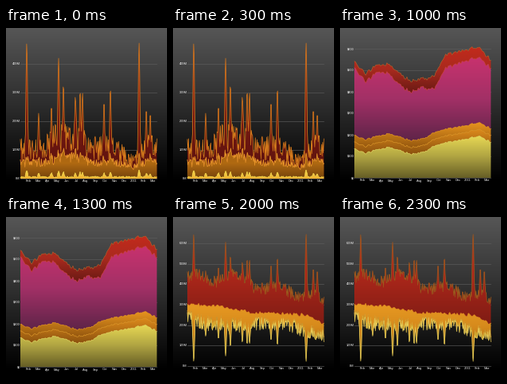
Recreate the animation shown at these times as a matplotlib script. Size 202 by 202 pixels, loop 2.5 s.

```python
import numpy as np
import matplotlib.pyplot as plt
from matplotlib.animation import FuncAnimation
from matplotlib.colors import to_rgb
from matplotlib.patches import Polygon

SIZE, DPI = 202, 100
LEFT, RIGHT = 18, 189.3
PX = 72 / DPI  # points per pixel
X = np.linspace(LEFT, RIGHT, 240)
MONTHS = "Feb Mar Apr May Jun Jul Aug Sep Oct Nov Dec 2011 Feb Mar".split()
WEEKS = ["Aug 15", "Aug 22", "Aug 29", "Sep 5", "Sep 12", "Sep 19", "Sep"]

RED, RED_DARK = "#c42a1c", "#6a1a14"
AMBER, AMBER_DARK = "#e8951f", "#96580f"
GOLD = "#f6dc50"

# Busy days as (x, height), shared by both daily charts
PEAKS = [(26, 169), (41, 82), (57, 88), (66, 151), (72, 115), (87, 102), (93, 107),
         (96, 107), (123, 93), (131, 110), (167, 170), (176, 84), (181, 79)]

fig = plt.figure(figsize=(SIZE / DPI, SIZE / DPI), dpi=DPI, facecolor="black")
ax = fig.add_axes([0, 0, 1, 1])


def curve(*values):
    """Line through evenly spaced key values."""
    return np.interp(X, np.linspace(LEFT, RIGHT, len(values)), values)


def scatter(seed, low, high):
    return np.random.default_rng(seed).uniform(low, high, X.size)


def wave(seed, amp, knots=110):
    return curve(*np.random.default_rng(seed).normal(0, amp, knots))


def tent(x, height, width):
    return height * np.clip(1 - abs(X - x) / width, 0, 1)


def spikes(peaks):
    return np.max([h * np.clip(1.25 - abs(X - x) / 1.7, 0, 1) for x, h in peaks], axis=0)


def ramp(colors, extent, **kw):
    stops = np.array([to_rgb(c) for c in colors])
    t = np.linspace(0, len(stops) - 1, 256)
    rows = np.stack([np.interp(t, range(len(stops)), ch) for ch in stops.T], axis=1)
    return ax.imshow(rows[:, None, :], extent=extent, aspect="auto",
                     interpolation="bilinear", **kw)


def area(top, bottom, colors, edge, width=0.7):
    bottom = np.broadcast_to(bottom, X.shape)
    outline = np.r_[np.c_[X, top], np.c_[X, bottom][::-1]]
    shape = ax.add_patch(Polygon(outline, fc="none", ec="none"))
    ramp(colors, (LEFT, RIGHT, bottom.max(), top.min()), zorder=2).set_clip_path(shape)
    ax.plot(X, top, color=edge, lw=width * PX, zorder=3)


def backdrop(top, bottom, steps, form, base, names=MONTHS, first=28, gap=12):
    ramp(["#565656", "#2d2d2d", "#000000"], (0, SIZE, 192, 0), zorder=0)
    for k in range(steps + 1):
        y = bottom + (top - bottom) * k / steps
        ax.plot([LEFT, RIGHT], [y, y], color="#5e5e5e", lw=0.6 * PX, zorder=1)
        ax.text(LEFT, y, form.format(100 * k), ha="right", va="center")
    for i, name in enumerate(names):
        ax.text(first + gap * i, base, name, ha="center", va="center")


def burst():
    backdrop(45, 189, 4, "{}M", 192)
    level = curve(34, 33, 34, 46, 56, 54, 36, 36, 38, 28, 20, 38, 37)
    tall = spikes(PEAKS)
    total = np.maximum(level * scatter(4, 0.58, 1.5), tall)
    mid = (7 + 0.36 * level) * scatter(9, 0.75, 1.3) + 0.06 * tall
    mid = np.minimum(mid, total - 1)
    low = 1.2 + scatter(2, 0, 2) + 0.05 * tall
    area(189 - total, 189, ["#b32a1c", "#7c1a12", "#57120e"], "#d87c1c", 0.75)
    area(189 - mid, 189, ["#a4600f", "#b06a12", "#74420c"], "#e8942a", 0.8)
    area(189 - low, 189, [GOLD, "#f0b030"], GOLD, 0.6)


def days():
    backdrop(24, 189, 6, "{}M", 191.5, WEEKS, 23, 27.6)
    bumps = sum(tent(*b) for b in [
        (31, 9, 4), (39, 6, 4), (59, 18, 5), (71, 14, 10), (91, 27, 4), (99, 15, 9),
        (119, 17, 5), (140, 14, 10), (156, 14, 8), (175, 33, 4.5), (183, 7, 7)])
    total = curve(150, 150, 146, 144, 149, 147, 149, 142, 137, 124, 133) - bumps
    hump = tent(140, 13, 13)
    upper = 174.5 - 0.25 * bumps - hump - tent(175, 26, 4) - tent(155, 4, 5)
    lower = 177 - 0.28 * bumps - hump - tent(155, 3, 5)
    base = 187.8 + 0.35 * np.sin(X / 3.7)
    area(total, upper, [RED, "#8a1e16", "#5a1410"], "#b06a20")
    area(upper, lower, [AMBER, "#b06c14"], "#f0a028", 0.8)
    area(lower, base, ["#c98a1a", "#a0700f", "#6e4c08"], "#f0b030", 0.8)
    area(base, 189, [GOLD, GOLD], GOLD, 0.6)


def layers(red, pink, amber, ochre, gold, floor):
    area(red, pink, [RED, "#a82a1e", RED_DARK], "#b8622a", 0.6)
    area(pink, amber, ["#c8326e", "#a23066", "#5e2448"], "#d8403c", 0.6)
    area(amber, ochre, [AMBER, AMBER_DARK], "#f09a28", 0.6)
    area(ochre, gold, ["#dc8a1c", "#8a500e"], "#f0a42c", 0.6)
    area(gold, floor, ["#eadb55", "#b0a442", "#665e26"], "#f4e468", 0.6)


def growth():
    backdrop(26, 188, 6, "${}", 191.5)
    ripple = wave(5, 1.5)
    red = curve(43, 57, 47, 46, 58, 68, 63, 60, 34, 31, 27, 25, 40) + ripple
    pink = red + curve(8, 10, 9, 14, 14, 11, 17, 16, 14, 13, 10)
    gold = curve(152, 157, 153, 150, 154, 159, 156, 148, 144, 142, 139, 136, 143)
    gold = gold + 0.5 * ripple
    layers(red, pink, gold - 17, gold - 8.5, gold, 188.5)


def stream():
    backdrop(26, 188, 6, "${}", 191.5)
    ripple = wave(8, 1.1)
    red = curve(28, 37, 33, 33, 40, 45, 41, 38, 26, 27, 24, 22, 24) + ripple
    pink = red + curve(8, 9, 9, 8, 9, 8, 10, 12, 13, 13)
    amber = 119.5 - 4.5 * np.exp(-((X - 92) / 22) ** 2) + 0.3 * ripple
    floor = curve(176, 166, 169, 170, 166, 158, 166, 170, 180, 182, 184, 184, 180)
    floor = np.minimum(floor + 1.4 * ripple, 188)
    area(floor, 188.5, ["#0c0c0a", "#060606"], "#1c1a0a", 0.5)
    layers(red, pink, amber, amber + 7.5, amber + 14.5, floor)


def mirror():
    backdrop(33, 187, 6, "{}M", 190)
    tall = spikes(PEAKS)
    red = curve(76, 72, 82, 80, 68, 76, 90, 90, 86, 94, 102, 96, 106)
    red = np.minimum(red - scatter(4, -8, 8), 110 - 0.52 * tall)
    amber = curve(109, 111, 113, 117, 121, 120, 122, 123, 135) + wave(11, 1.3)
    low = curve(124, 136, 135, 138, 135, 136, 136, 145, 150)
    low = np.maximum(low + scatter(12, -9, 8), 120 + 0.36 * tall)
    gold = amber + 0.75 * (low - amber)
    area(red, amber, [RED, "#a8261a", "#7e1c14"], "#a05a1c", 0.7)
    area(amber, gold, ["#e89a22", "#d68a1c", "#a8640f"], "#e88a20", 0.7)
    area(gold, low, ["#e0b030", "#c09a28"], "#e0a030", 0.6)
    ax.plot(X, low, color="#ecd05a", lw=0.7 * PX, zorder=3)


SCENES = [burst, days, growth, stream, mirror]


def draw(i):
    ax.clear()
    ax.set_axis_off()
    SCENES[i]()
    ax.set_xlim(0, SIZE)
    ax.set_ylim(SIZE, 0)
    return []


plt.rcParams.update({"font.family": "Liberation Sans", "font.size": 4 * PX,
                     "text.color": "#f0f0f0", "path.simplify": False})
anim = FuncAnimation(fig, draw, frames=len(SCENES), interval=500, repeat=True)
plt.show()
```
